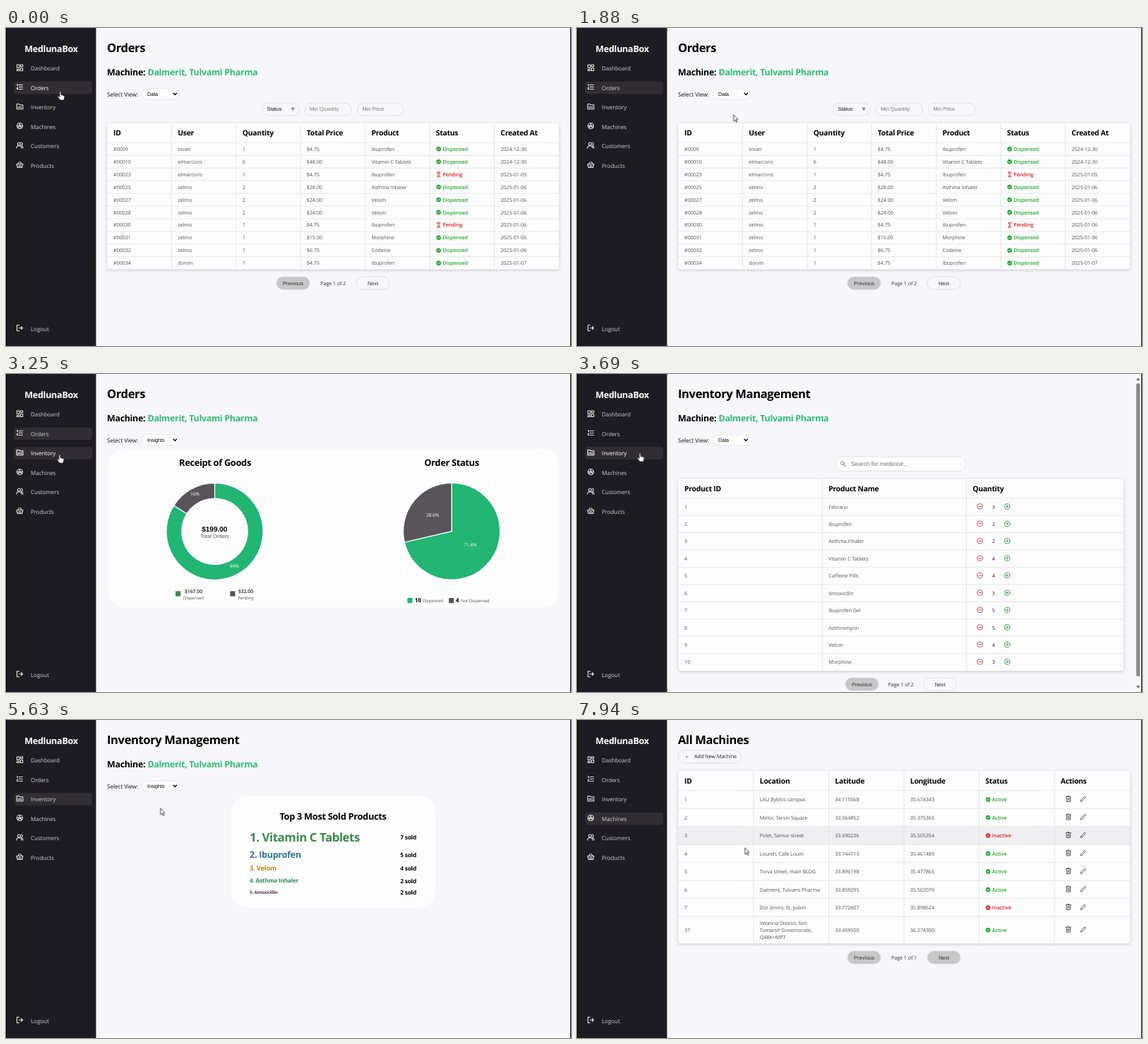
An HTML page for the animation above (8 s loop, 800x450 px).

```html
<!DOCTYPE html>
<html lang="en">
<head>
<meta charset="utf-8">
<title>Vending admin</title>
<style>
html, body { margin: 0; height: 100%; overflow: hidden; background: #f7f6fb; }
svg { display: block; width: 100vw; height: 100vh; }
text { font: 7.2px "Open Sans", "Noto Sans", sans-serif; letter-spacing: -.01em; fill: #555; text-rendering: geometricPrecision; white-space: pre; }
.bold { font-weight: 700; letter-spacing: -.024em; fill: #000; }
.semi { font-weight: 600; }
.ui { font-family: "Liberation Sans", Arial, sans-serif; letter-spacing: 0; }
.mid { text-anchor: middle; }
.end { text-anchor: end; }
.line { fill: none; stroke-linecap: round; stroke-linejoin: round; }
.panel { fill: #fefdfe; }
.card { fill: #fefdfe; filter: drop-shadow(0 1px 2px #0003); }
.nav { fill: #cdcdd0; stroke: #e4e4e6; stroke-width: 1.15; }
.nav.lit { fill: #fff; stroke: #fff; }
.nav text { font-size: 8.1px; fill: inherit; stroke: none; }

/* Percentages are milliseconds / 80. */
[class^="at-"] { animation: 8s step-end infinite; }
.at-orders { animation-name: orders; }
.at-orderData { animation-name: orderData; }
.at-orderInsights { animation-name: orderInsights; }
.at-inventory { animation-name: inventory; }
.at-stockData { animation-name: stockData; }
.at-stockInsights { animation-name: stockInsights; }
.at-machines { animation-name: machines; }
.at-hoverOrders { animation-name: hoverOrders; }
.at-hoverInventory { animation-name: hoverInventory; }
.at-hoverCustomers { animation-name: hoverCustomers; }
.at-hoverMachines { animation-name: hoverMachines; }
.at-hoverRow { animation-name: hoverRow; }
.at-hand { animation-name: hand; }
.at-arrow { animation-name: arrow; }
@keyframes orders { 0% { opacity: 1 } 44.5% { opacity: 0 } }
@keyframes orderData { 0% { opacity: 1 } 25.75% { opacity: 0 } }
@keyframes orderInsights { 0% { opacity: 0 } 25.75% { opacity: 1 } 44.5% { opacity: 0 } }
@keyframes inventory { 0% { opacity: 0 } 44.5% { opacity: 1 } 92.25% { opacity: 0 } }
@keyframes stockData { 0% { opacity: 0 } 44.5% { opacity: 1 } 70.375% { opacity: 0 } }
@keyframes stockInsights { 0% { opacity: 0 } 70.375% { opacity: 1 } 92.25% { opacity: 0 } }
@keyframes machines { 0% { opacity: 0 } 92.25% { opacity: 1 } }
@keyframes hoverOrders { 0% { opacity: 1 } 3.4% { opacity: 0 } }
@keyframes hoverInventory { 0% { opacity: 0 } 38.25% { opacity: 1 } 47.6% { opacity: 0 } }
@keyframes hoverCustomers { 0% { opacity: 0 } 80.7% { opacity: 1 } 82.7% { opacity: 0 } }
@keyframes hoverMachines { 0% { opacity: 0 } 82.7% { opacity: 1 } 93.9% { opacity: 0 } }
@keyframes hoverRow { 0% { opacity: 0 } 94.5% { opacity: 1 } }
@keyframes hand {
  0% { opacity: 1 } 3.4% { opacity: 0 } 38.25% { opacity: 1 } 47.6% { opacity: 0 }
  80.7% { opacity: 1 } 93.9% { opacity: 0 }
}
@keyframes arrow {
  0% { opacity: 0 } 3.4% { opacity: 1 } 38.25% { opacity: 0 } 47.6% { opacity: 1 }
  80.7% { opacity: 0 } 93.9% { opacity: 1 }
}
#pointer { animation: move 8s ease-in-out infinite; }
@keyframes move {
  0%, .6% { transform: translate(77px, 90px) }
  8.625%, 18.1% { transform: translate(236px, 99px) }
  23.5%, 32.8% { transform: translate(221.7px, 122.7px) }
  32.875%, 34.5% { transform: translate(226px, 123px) }
  40.625%, 44.3% { transform: translate(76px, 114px) }
  53.125%, 60.3% { transform: translate(224.5px, 90.3px) }
  61%, 61.6% { transform: translate(231.7px, 98.7px) }
  67.25%, 76.7% { transform: translate(218.7px, 124.7px) }
  81% { transform: translate(112px, 160px); animation-timing-function: ease-out }
  85.125%, 92.1% { transform: translate(67px, 147px) }
  96.125%, 97.8% { transform: translate(195.5px, 160.5px); animation-timing-function: linear }
  99.25%, 100% { transform: translate(237.8px, 180.7px) }
}
</style>
</head>
<body>
<svg id="stage" viewBox="0 0 800 450"></svg>
<script>
const GREEN = '#22b573', GRAY = '#58555a', OK = '#22a92f', BAD = '#d61f1f';

const text = (x, y, str, cls = '', size = 7.2, fill = '') =>
  `<text x="${x}" y="${y}" class="${cls}" style="font-size:${size}px${fill && ';fill:' + fill}">${str}</text>`;
const rect = (x, y, w, h, r, attrs) =>
  `<rect x="${x}" y="${y}" width="${w}" height="${h}" rx="${r}" ${attrs}/>`;
const stroke = (d, color, width = 1) =>
  `<path class="line" d="${d}" stroke="${color}" stroke-width="${width}"/>`;
const disc = (x, y, r, attrs) => `<circle cx="${x}" cy="${y}" r="${r}" ${attrs}/>`;
const at = (x, y, body) => `<g transform="translate(${x} ${y})">${body}</g>`;
const during = (name, ...parts) => `<g class="at-${name}">${parts.join('')}</g>`;

const pill = (x, y, w, h, fill = '#f8f7fb') => rect(x, y, w, h, h / 2, `fill="${fill}" stroke="#dadadd" stroke-width=".8"`);
const title = str => text(143, 34, str, 'bold', 16.6);
const heading = (x, y, str) => text(x, y, str, 'bold mid', 12.8);

// Sidebar
const navItems = [
  ['Dashboard', '<path d="M-4-4h3.2v4.5h-3.2zM1-4h3.2v2.5h-3.2zM1 .5h3.2v4h-3.2zM-4 2.5h3.2v2h-3.2z"/>'],
  ['Orders', '<path d="M-1-3h5M-1 0h5M-1 3h5M-4-3.5h1v2M-4 1h1.2l-1.2 2h1.4"/>'],
  ['Inventory', '<path d="M-4.2-3.5h3l1 1.2h4.6v6h-8.6zM-2 0v2M0 0v2M2 0v2"/>'],
  ['Machines', '<circle r="4"/><circle r="1.2"/><path d="M-4 0h2.8M1.2 0h2.8M0-4v2.8M-1 1l-2 2M1 1l2 2"/>'],
  ['Customers', '<circle cx="-1" cy="-2" r="2"/><path d="M-4.5 4v-1c0-3 7-3 7 0v1M2.2-4c2.2.3 2.2 3.6 0 3.9M4.5 4v-1q0-1.5-1.5-2"/>'],
  ['Products', '<path d="M-4.4-1h8.8l-1.2 5h-6.4zM-2.8-1l2-3M2.8-1l-2-3M-1.5 1v1.5M0 1v1.5M1.5 1v1.5"/>'],
  ['Logout', '<path d="M-1-4h-3v8h3M-1 0h5M2-2l2 2-2 2"/>'],
];
const navY = i => i === 6 ? 425.5 : 57 + 27.5 * i;
const navItem = (i, lit = '') => `<g class="nav ${lit}">` +
  at(19.5, navY(i) - 1, `<g class="line">${navItems[i][1]}</g>`) + text(35, navY(i) + 3, navItems[i][0], '', 8.1) + '</g>';
const navBar = i => rect(11.5, navY(i) - 8.7, 110.5, 17.4, 4, 'fill="#302e32"');
const active = (name, i) => during(name, navBar(i), navItem(i));
const hover = (name, i) => during(name, navBar(i), navItem(i, 'lit'));

const sidebar = rect(0, 0, 127.5, 450, 0, 'fill="#1c1c22"') +
  text(64, 34, 'MedlunaBox', 'bold mid', 12.6, '#fff') +
  navItems.map((_, i) => navItem(i)).join('') +
  active('orders', 1) + active('inventory', 2) + active('machines', 3) +
  hover('hoverOrders', 1) + hover('hoverInventory', 2) + hover('hoverMachines', 3) + hover('hoverCustomers', 4);

// Shared page parts
const machineHead = text(143, 67, 'Machine:', 'bold', 12.45) +
  text(200.5, 67, 'Dalmerit, Tulvami Pharma', 'bold', 12.45, '#2dbd72') +
  text(143, 96.7, 'Select View:', '', 8.25, '#111') +
  rect(192, 86, 53, 15, 7.5, 'fill="#fefdfe" stroke="#e4e3e8" stroke-width=".8"');
const view = name => text(200, 95.8, name, 'ui', 7.15, '#000') + stroke('M237 92.2l2.3 2.3 2.3-2.3', '#000', 1.3);

function pager([prev, label, next], y, pages, lastPage) {
  return pill(prev, y, 47, 18, '#c7c7ca') + text(prev + 23.5, y + 11.5, 'Previous', 'ui mid', 7.4, '#333') +
    text(label, y + 11.8, `Page 1 of ${pages}`, '', 7.2, '#333') +
    pill(next, y, 47, 18, lastPage ? '#c7c7ca' : undefined) + text(next + 23.5, y + 11.5, 'Next', 'ui mid', 7.4, '#333');
}

const check = disc(0, 0, 3.3, `fill="${OK}"`) + stroke('M-1.5 0l1.1 1.2 2-2.3', '#fff', .9);
const cross = disc(0, 0, 3.3, `fill="${BAD}"`) + stroke('M-1.2-1.2l2.4 2.4M1.2-1.2l-2.4 2.4', '#fff', .9);
const hourglass = stroke('M-2.2-3h4.4M-2.2 3h4.4M-1.6-3c0 3 3.2 3 3.2 6M1.6-3c0 3-3.2 3-3.2 6', BAD, .9);
const status = (name, icon, color) => (x, y) =>
  at(x + 3.8, y, icon) + text(x + 9.5, y + 2.6, name, 'semi', 7.25, color);
const dispensed = status('Dispensed', check, OK);
const pending = status('Pending', hourglass, BAD);
const online = status('Active', check, OK);
const offline = status('Inactive', cross, BAD);

const quantity = n => (x, y) => {
  const button = (dx, sign, color) => at(x + dx, y - .6, `<circle class="line" r="3.8" stroke="${color}" stroke-width=".9"/>` + stroke(sign, color, .9));
  return button(10, 'M-1.8 0h3.6', '#c8393c') + text(x + 29.5, y + 2.6, n, 'mid', 7.2, '#222') +
    button(48.8, 'M-1.8 0h3.6M0-1.8v3.6', '#2fa045');
};
const actions = (x, y) =>
  at(x + 11, y - 1, stroke('M-3.5-3h7M-1-4h2M-2.7-3v7h5.4v-7M-.9-1v3.3M.9-1v3.3', '#444', .9)) +
  at(x + 32, y - 1, stroke('M-3.5 3.5l.5-2 5-5 1.5 1.5-5 5z', '#444', .9));

function cell(content, x, y) {
  if (typeof content === 'function') return content(x, y);
  const lines = String(content).split('\n');
  return lines.map((line, i) => text(x, y + 2.6 + 10 * (i - (lines.length - 1) / 2), line)).join('');
}

// edges: column borders from left to right, including both outer ones
function table(edges, top, headEnd, rowH, headers, rows, lastH = rowH, under = '') {
  const left = edges[0], right = edges.at(-1), n = rows.length;
  const bottom = headEnd + rowH * (n - 1) + lastH;
  const across = rows.map((_, i) => `M${left} ${headEnd + rowH * i}H${right}`).join('');
  const down = edges.slice(1, -1).map(x => `M${x} ${top}V${bottom}`).join('');
  const textX = c => edges[c] + 8.8;
  return rect(left, top, right - left, bottom - top, 3, 'class="card"') + under +
    stroke(across + down, '#e0e0e3', .8) +
    headers.map((h, c) => text(textX(c), (top + headEnd) / 2 + 3.8, h, 'bold', 10.35)).join('') +
    rows.map((row, i) => row.map((v, c) =>
      cell(v, textX(c), headEnd + rowH * i + (i === n - 1 ? lastH : rowH) / 2)).join('')).join('');
}

// Orders
const orders = [
  ['#0009', 'tovan', 1, '4.75', 'Ibuprofen', dispensed, '2024-12-30'],
  ['#00010', 'elmarcoris', 6, '48.00', 'Vitamin C Tablets', dispensed, '2024-12-30'],
  ['#00023', 'elmarcoris', 1, '4.75', 'Ibuprofen', pending, '2025-01-05'],
  ['#00025', 'zelmo', 2, '28.00', 'Asthma Inhaler', dispensed, '2025-01-06'],
  ['#00027', 'zelmo', 2, '24.00', 'Velom', dispensed, '2025-01-06'],
  ['#00028', 'zelmo', 2, '24.00', 'Velom', dispensed, '2025-01-06'],
  ['#00030', 'zelmo', 1, '4.75', 'Ibuprofen', pending, '2025-01-06'],
  ['#00031', 'zelmo', 1, '15.00', 'Morphine', dispensed, '2025-01-06'],
  ['#00032', 'zelmo', 1, '6.75', 'Codeine', dispensed, '2025-01-06'],
  ['#00034', 'dorvin', 1, '4.75', 'Ibuprofen', dispensed, '2025-01-07'],
].map(row => row.with(3, '$' + row[3]));

const orderData = view('Data') +
  pill(363, 106, 52, 18) + text(369.5, 117.3, 'Status', 'ui', 7.4, '#111') + '<path d="M403.3 112.5h5.6l-2.8 5z" fill="#8c8c8c"/>' +
  pill(423, 106, 66, 18) + text(430, 117.3, 'Min Quantity', 'ui', 7.35, '#777') +
  pill(498, 106, 65.5, 18) + text(504.5, 117.3, 'Min Price', 'ui', 7.35, '#777') +
  table([143.3, 234.5, 326, 417, 508.7, 600, 691.5, 783], 135, 162.3, 17.93,
    ['ID', 'User', 'Quantity', 'Total Price', 'Product', 'Status', 'Created At'], orders) +
  pager([383, 445, 496], 352, 2);

function wedge(cx, cy, r, from, to, color) {
  const point = f => `${cx + r * Math.sin(2 * Math.PI * f)} ${cy - r * Math.cos(2 * Math.PI * f)}`;
  return `<path d="M${cx} ${cy}L${point(from)}A${r} ${r} 0 ${+(to - from > .5)} 1 ${point(to)}Z" fill="${color}" stroke="#fff" stroke-width="1.2"/>`;
}
const pie = (cx, cy, share) => wedge(cx, cy, 68.5, 0, share, GREEN) + wedge(cx, cy, 68.5, share, 1, GRAY);
const percent = (x, y, str) => text(x, y, str, 'mid', 6.6, '#fff');
const swatch = (x, y, color) => rect(x, y, 7.2, 7.2, 0, `fill="${color}"`);
const amount = (x, value, label) => text(x, 310, value, 'semi mid', 6.9, '#222') + text(x, 318.6, label, 'mid', 6);

const orderInsights = view('Insights') +
  rect(144, 106, 638.5, 224.5, 24, 'class="panel"') +
  heading(296, 130, 'Receipt of Goods') + heading(631, 130, 'Order Status') +
  pie(295.5, 222.8, .84) + disc(295.5, 222.8, 47.3, 'class="panel"') +
  percent(267.5, 172, '16%') + percent(323.3, 274, '84%') +
  text(295.3, 222.8, '$199.00', 'ui bold mid', 10) + text(295.5, 232.2, 'Total Orders', 'ui mid', 7.45) +
  swatch(240, 307.3, '#388e4c') + amount(265.5, '$167.00', 'Dispensed') +
  swatch(317.3, 307.3, GRAY) + amount(339.5, '$32.00', 'Pending') +
  pie(631, 222.6, .714) + percent(604, 202, '28.6%') + percent(657.3, 244, '71.4%') +
  swatch(568.3, 317, GREEN) + text(578.7, 323.4, '10', 'bold', 8.2) + text(590, 323, 'Dispensed', '', 6) +
  swatch(627, 317, GRAY) + text(636.8, 323.4, '4', 'bold', 8.2) + text(644, 323, 'Not Dispensed', '', 6);

// Inventory
const stock = [['Febrano', 3], ['Ibuprofen', 2], ['Asthma Inhaler', 2], ['Vitamin C Tablets', 4], ['Caffeine Pills', 4],
  ['Amoxicillin', 3], ['Ibuprofen Gel', 5], ['Azithromycin', 5], ['Velom', 4], ['Morphine', 3]];
const stockData = view('Data') +
  pill(366, 117, 185, 20.5, '#fefdfe') +
  `<circle class="line" cx="375.7" cy="126.3" r="2.4" stroke="#888"/>` + stroke('M377.6 128.2l2.4 2.4', '#888', 1.2) +
  text(388, 130.2, 'Search for medicine...', 'ui', 8.33, '#757575') +
  table([143.3, 347.5, 551.5, 774], 149, 175.8, 24.42, ['Product ID', 'Product Name', 'Quantity'],
    stock.map(([name, n], i) => [i + 1, name, quantity(n)])) +
  pager([380, 440.5, 490.5], 430, 2) +
  rect(790, 0, 10, 450, 0, 'fill="#f9f9fb"') + rect(791.8, 13, 5.4, 415, 2.7, 'fill="#8b8b8d"') +
  '<path d="M791.7 9h5.6l-2.8-4zM791.7 441h5.6l-2.8 4z" fill="#777"/>';

const ranking = [
  ['Vitamin C Tablets', 7, 16.8, 172.3, 169, '#3a8c48'],
  ['Ibuprofen', 5, 12.6, 195, 193.5, '#2f7593'],
  ['Velom', 4, 9.4, 213.3, 213, '#c0861c'],
  ['Asthma Inhaler', 2, 8.2, 230.4, 230.5, '#2f8b5e'],
  ['Amoxicillin', 2, 6.3, 246.3, 247.3, '#57305c'],
];
const stockInsights = view('Insights') +
  rect(319, 107, 289, 158.5, 24, 'class="panel"') + heading(463, 140.5, 'Top 3 Most Sold Products') +
  ranking.map(([name, sold, size, y, soldY, color], i) =>
    text(345, y, `${i + 1}. ${name}`, 'bold', size, color) + text(581, soldY, sold + ' sold', 'bold end', 8.3)).join('');

// Machines
const machines = [
  ['1', 'LAU Byblos campus', '34.115568', '35.674343', online],
  ['2', 'Melor, Tarvin Square', '33.564852', '35.375365', online],
  ['3', 'Polet, Samur street', '33.690236', '35.505354', offline],
  ['4', 'Loureh, Cafe Loum', '33.744713', '35.461489', online],
  ['5', 'Torva street, main BLDG', '33.896198', '35.477865', online],
  ['6', 'Dalmerit, Tulvami Pharma', '33.859295', '35.502079', online],
  ['7', 'Dor Emiro, St. palon', '33.772607', '35.898624', offline],
  ['37', 'Velanna District, Nor\nTomarsh Governorate,\nQ48K+MPT', '33.459500', '36.274300', online],
].map(row => [...row, actions]);
const machinePage = title('All Machines') +
  pill(143, 43, 89, 18) + stroke('M153.3 52h4.4M155.5 49.8v4.4', '#888', .7) +
  text(166, 54.4, 'Add New Machine', '', 7.25, '#222') +
  table([143.3, 250, 356.5, 463, 569.5, 676, 783], 72, 99.8, 25.5,
    ['ID', 'Location', 'Latitude', 'Longitude', 'Status', 'Actions'], machines, 38,
    during('hoverRow', rect(143.3, 150.8, 639.7, 25.5, 0, 'fill="#efeef0"'))) +
  pager([383, 445, 496], 327, 1, true);

const pointer = '<g id="pointer" stroke="#222" stroke-width=".8" stroke-linejoin="round" fill="#fff">' +
  during('arrow', '<path d="M0 0V9.2L2.1 7.3 3.6 10.6 5 10 3.6 6.8H6.3Z"/>') +
  during('hand', '<path d="M-1 1a1 1 0 0 1 2 0v3.6l3.8 1c1 .3 1.3 1 1.1 2l-.9 4.4h-5.2l-3.2-4.3c-.6-1 .7-1.8 1.4-1l1 1z"/>') + '</g>';

// Thin dark borders at both sides of the window
const windowEdges = rect(0, 0, 1, 450, 0, '') + rect(799, 0, 1, 450, 0, '');

document.getElementById('stage').innerHTML =
  rect(0, 0, 800, 450, 0, 'fill="#f7f6fb"') + sidebar +
  during('orders', title('Orders'), machineHead) +
  during('orderData', orderData) + during('orderInsights', orderInsights) +
  during('inventory', title('Inventory Management'), machineHead) +
  during('stockData', stockData) + during('stockInsights', stockInsights) +
  during('machines', machinePage) + windowEdges + pointer;
</script>
</body>
</html>
```
